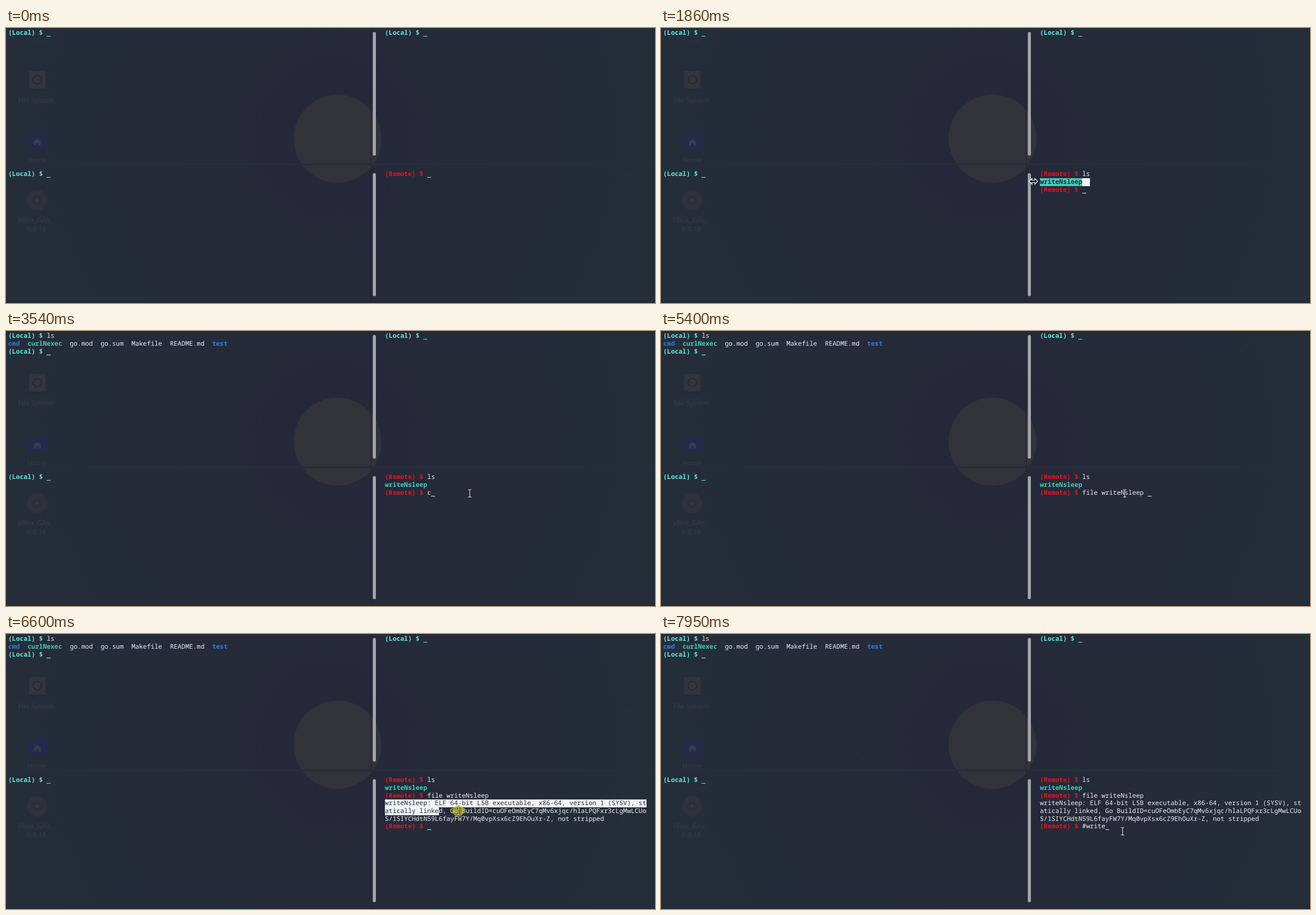
An HTML page with a canvas that plays this animation: 1151x487 px, repeating every 8000 ms.

```html
<!DOCTYPE html>
<html lang="en">
<head>
<meta charset="utf-8">
<title>Split terminal</title>
<style>
  html, body { margin: 0; width: 100%; height: 100%; overflow: hidden; background: #252b39; }
  canvas { display: block; }
</style>
</head>
<body>
<canvas id="stage" width="1151" height="487"></canvas>
<script>
const ctx = document.getElementById('stage').getContext('2d');
const LOOP = 8000, TICK = 30;
const CELL = 6.825, LINE = 13.65, COLUMNS = 68;
const LEFT = 4, RIGHT = 672, TOP = 2.3, BOTTOM = 252.3;
const BACK = '#252b39', WHITE = '#e9eef2', PAPER = '#f0f7fb', CYAN = '#62eee6',
      RED = '#e9131c', TEAL = '#43cbb8', BLUE = '#2f7fe8';

// Each stage: start, end, resulting text; letters appear or vanish one by one.
const localLs = [[2340, 2400, 'ls']];
const remoteLs = [[690, 750, 'ls']];
const remoteFile = [
  [3540, 3660, 'clea'], [3840, 3840, 'clear'], [4080, 4350, ''],
  [4590, 4770, 'file '], [4920, 5250, 'file write'], [5400, 5400, 'file writeNsleep ']
];
const remoteNote = [[7410, 7410, '#'], [7680, 7950, '#write']];
const fileReport = [
  'writeNsleep: ELF 64-bit LSB executable, x86-64, version 1 (SYSV), st',
  'atically linked, Go BuildID=cuOFeOmbEyC7qMv6xjqc/hlaLPQFxr3cLgMwLCUo',
  'S/1SIYCHdtN59L6fayFW7Y/Mq0vpXsx6cZ9EhOuXr-Z, not stripped'
];

// Pointer path: time, x, y.
const path = [
  [150, 914, 236], [300, 876, 337], [420, 834, 303], [1080, 834, 303],
  [1380, 754, 271], [1440, 754, 271], [1560, 735, 282], [1680, 690, 272],
  [1800, 660, 271], [1890, 660, 271], [2040, 302, 42], [2760, 302, 42],
  [2970, 924, 250], [3090, 822, 287], [5910, 822, 287], [6180, 664, 300],
  [6240, 664, 300], [6510, 700, 308], [6570, 768, 312], [6600, 802, 313],
  [6690, 838, 313], [6720, 838, 313], [6900, 818, 349], [LOOP, 818, 349]
];
const presses = [[420, 480], [1400, 1830], [2040, 2100], [3090, 3180], [6210, 6720], [6900, 6990]];

function pointerAt(t) {
  const next = path.findIndex(point => point[0] > t);
  if (next < 1) return null;
  const [t0, x0, y0] = path[next - 1], [t1, x1, y1] = path[next];
  const k = (t - t0) / (t1 - t0);
  return { x: x0 + (x1 - x0) * k, y: y0 + (y1 - y0) * k };
}

function typed(stages, t) {
  let text = '';
  for (const [start, end, goal] of stages) {
    if (t < start) break;
    if (t >= end) { text = goal; continue; }
    const change = goal.length - text.length;
    const done = 1 + Math.floor((t - start) / (end - start) * (Math.abs(change) - 1));
    const longer = change > 0 ? goal : text;
    return longer.slice(0, text.length + Math.sign(change) * done);
  }
  return text;
}

const run = (col, text, color = WHITE, bold = false) => ({ col, text, color, bold });

function promptRow(name, color, input, cursorColor) {
  const prompt = `(${name}) $ `;
  const row = [run(0, prompt, color, true), run(prompt.length, input)];
  if (cursorColor) row.cursor = { col: prompt.length + input.length, color: cursorColor };
  return row;
}

function localRows(t) {
  const done = t >= 2460;
  const rows = [promptRow('Local', CYAN, typed(localLs, t), !done && (t < 2340 ? CYAN : WHITE))];
  if (done) rows.push([
    run(0, 'cmd', BLUE, true), run(5, 'curlNexec', TEAL, true), run(16, 'go.mod'), run(24, 'go.sum'),
    run(32, 'Makefile'), run(42, 'README.md'), run(53, 'test', BLUE, true)
  ], promptRow('Local', CYAN, '', WHITE));
  return rows;
}

function remoteRows(t) {
  const listed = t >= 900, reported = t >= 5640;
  const rows = [promptRow('Remote', RED, typed(remoteLs, t), !listed && (t < 690 ? '#a9e9e6' : WHITE))];
  if (listed) rows.push([run(0, 'writeNsleep', TEAL, true)],
    promptRow('Remote', RED, typed(remoteFile, t), !reported && WHITE));
  if (reported) rows.push(...fileReport.map(line => [run(0, line)]),
    promptRow('Remote', RED, typed(remoteNote, t), WHITE));
  return rows;
}

// Selected cells of the remote pane as { row: [from, to] }.
function selection(t) {
  const first = t > 1440 && t < 3090, second = t > 6240 && t < 6900;
  if (!first && !second) return {};
  const lag = first ? 0 : TICK;
  const { x, y } = pointerAt(first ? Math.min(t, 1800) : Math.min(t, 6720) - lag);
  const col = Math.max(0, Math.min(COLUMNS, Math.round((x - RIGHT) / CELL)));
  const row = Math.floor((y - BOTTOM) / LINE);
  if (first) return row > 1 ? { 1: [13, COLUMNS], 2: [0, col] } : { 1: [Math.min(col, 13), 13] };
  return row > 3 ? { 3: [0, COLUMNS], 4: [0, col] } : { 3: [0, col] };
}

function drawRuns(row, x, baseline, color) {
  for (const part of row) {
    ctx.font = `${part.bold ? 'bold ' : ''}11.375px "Noto Sans Mono", monospace`;
    ctx.fillStyle = color || part.color;
    ctx.fillText(part.text, x + part.col * CELL, baseline);
  }
}

function drawPane(rows, x, y, selected = {}) {
  ctx.textAlign = 'left';
  rows.forEach((row, i) => {
    const top = Math.round(y + i * LINE), baseline = top + 10;
    drawRuns(row, x, baseline);
    if (row.cursor) {
      ctx.fillStyle = row.cursor.color;
      ctx.fillRect(Math.round(x + row.cursor.col * CELL), top + 12, 7, 1);
    }
    if (!selected[i]) return;
    const [from, to] = selected[i];
    ctx.save();
    ctx.beginPath();
    ctx.rect(x + from * CELL, top, (to - from) * CELL, 14);
    ctx.clip();
    ctx.fillStyle = PAPER;
    ctx.fillRect(x, top, COLUMNS * CELL, 14);
    for (const part of row) {
      ctx.fillStyle = part.color === WHITE ? PAPER : part.color;
      ctx.fillRect(x + part.col * CELL, top, part.text.length * CELL, 14);
    }
    drawRuns(row, x, baseline, BACK);
    ctx.restore();
  });
}

function disc(x, y, r, color) {
  ctx.fillStyle = color;
  ctx.beginPath();
  ctx.arc(x, y, r, 0, 2 * Math.PI);
  ctx.fill();
}

function box(x, y, w, h, r, color) {
  ctx.fillStyle = color;
  ctx.beginPath();
  ctx.roundRect(x, y, w, h, r);
  ctx.fill();
}

function label(text, x, y, color = '#363b47') {
  ctx.font = '12.3px "Noto Sans", sans-serif';
  ctx.textAlign = 'center';
  ctx.fillStyle = color;
  ctx.fillText(text, x, y);
}

function drawDesktop() {
  ctx.fillStyle = BACK;
  ctx.fillRect(0, 0, 1151, 487);
  const glow = ctx.createRadialGradient(580, 190, 20, 580, 190, 560);
  glow.addColorStop(0, '#24283a');
  glow.addColorStop(0.3, '#252a39');
  glow.addColorStop(1, '#252d39');
  ctx.fillStyle = glow;
  ctx.fillRect(0, 0, 1151, 487);
  disc(588, 196, 78, '#313339');

  label('Trash', 56, 27, '#2e3441');
  box(41, 76, 29, 35, 1, '#32353c');
  box(41, 107, 29, 4, 0, '#262a33');
  ctx.strokeStyle = '#20252f';
  ctx.lineWidth = 1.5;
  ctx.beginPath();
  ctx.arc(55.5, 91.5, 7.5, 0, 2 * Math.PI);
  ctx.stroke();
  label('File System', 54, 132);

  box(38, 188, 36, 26, 2, '#25294a');
  ctx.fillStyle = '#383d50';
  ctx.fill(new Path2D('M55.5 196l6 5v7h-4v-4h-4v4h-4v-7z'));
  label('Home', 55, 238);

  disc(55, 305, 18, '#2d323d');
  disc(55, 305, 8, '#29303a');
  disc(55, 305, 3, '#353a43');
  label('VBox_GAs_', 52, 344);
  label('6.0.18', 54, 360);

  ctx.fillStyle = '#252e3b';
  ctx.fillRect(0, 240, 1151, 3);
  ctx.fillStyle = '#1f2532';
  ctx.fillRect(647, 0, 1, 487);
  ctx.fillRect(1150, 0, 1, 487);
  ctx.fillRect(0, 486, 1151, 1);
  box(650.5, 7, 5.5, 219, 2.7, '#a3a5ad');
  box(650.5, 257, 5.5, 218, 2.7, '#a3a5ad');
}

const iBeam = new Path2D('M-3-6.5h2.2l.8.7.8-.7H3M-3 6.5h2.2l.8-.7.8.7H3M0-6V6');
const resizeArrow = new Path2D('M-7.5 0l5-5v3h5v-3l5 5-5 5v-3h-5v3z');

function drawPointer(t) {
  const spot = pointerAt(t);
  if (!spot) return;
  if (presses.some(([down, up]) => t >= down && t < up)) disc(spot.x, spot.y, 10.3, 'rgba(227,211,14,.6)');
  ctx.save();
  ctx.translate(Math.round(spot.x) + 0.5, Math.round(spot.y) + 0.5);
  const trace = (shape, color, width) => {
    ctx.strokeStyle = color;
    ctx.lineWidth = width;
    ctx.stroke(shape);
  };
  if (Math.abs(spot.x - 656) < 7) {
    ctx.fillStyle = '#14171e';
    ctx.fill(resizeArrow);
    trace(resizeArrow, '#f4f4f4', 1.2);
  } else {
    trace(iBeam, '#171b24', 2.6);
    trace(iBeam, '#f4f4f4', 1.1);
  }
  ctx.restore();
}

function draw(now) {
  const t = Math.floor(now % LOOP / TICK) * TICK;
  ctx.textRendering = 'geometricPrecision';
  drawDesktop();
  drawPane(localRows(t), LEFT, TOP);
  drawPane([promptRow('Local', CYAN, '', CYAN)], RIGHT, TOP);
  drawPane([promptRow('Local', CYAN, '', CYAN)], LEFT, BOTTOM);
  drawPane(remoteRows(t), RIGHT, BOTTOM, selection(t));
  drawPointer(t);
}

let start;
function frame(now) {
  start ??= now;
  draw(now - start);
  requestAnimationFrame(frame);
}
requestAnimationFrame(frame);
</script>
</body>
</html>
```
